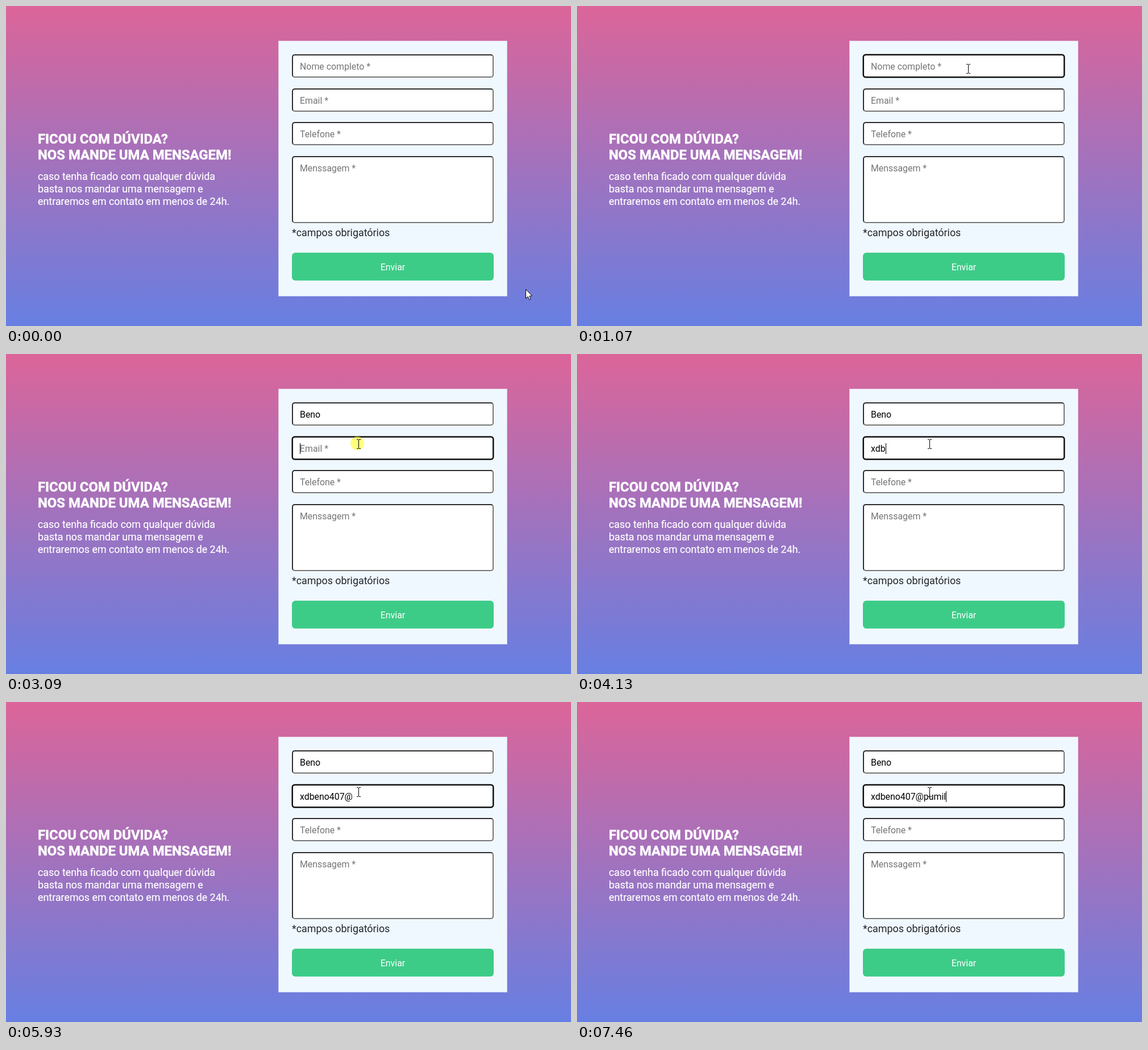
An HTML page with a canvas for the animation above (7990 ms loop, 994 by 563 pixels).

```html
<!DOCTYPE html>
<html lang="pt-BR">
<head>
<meta charset="utf-8">
<title>Formulário de contato</title>
<style>
  html, body { margin: 0; width: 100%; height: 100%; overflow: hidden; }
  body { position: relative; font: 17.86px/22px Roboto, sans-serif; color: #fff;
         background: linear-gradient(#dc6599, #677fe2); }
  body > * { position: absolute; box-sizing: border-box; margin: 0; white-space: pre; }
  h1 { left: 56px; top: 220px; font-size: 23.86px; line-height: 28px; font-weight: 700;
       -webkit-text-stroke: 0.5px #fff; }
  p { left: 56px; top: 289px; -webkit-text-stroke: 0.2px #fff; }
  #panel { left: 479px; top: 61px; width: 403px; height: 450px; background: #f0f8ff;
           background-clip: padding-box; border: 1px solid rgba(240,248,255,0.65); }
  .field { left: 503px; width: 355px; height: 41px; padding: 10px 12px; background: #fff;
           border: 2px solid; border-color: #2e2e2e #767676 #767676 #2e2e2e;
           border-radius: 5px; font-size: 15.88px; line-height: 19px; color: #757575; }
  .field.filled { color: #000; }
  .field.focus { border-color: #101010; box-shadow: 0 0 0 0.5px #101010; }
  .caret { display: inline-block; width: 1px; height: 19px; margin-right: -1px;
           background: #000; vertical-align: top; }
  #note { left: 503px; top: 388px; color: #212529; }
  #send { left: 503px; top: 434px; width: 355px; height: 49px; border-radius: 6px;
          background: #3dcc88; font-size: 15.88px; line-height: 51px; text-align: center; }
  #pointer { left: 0; top: 0; }
</style>
</head>
<body>
<h1>FICOU COM DÚVIDA?
NOS MANDE UMA MENSAGEM!</h1>
<p>caso tenha ficado com qualquer dúvida
basta nos mandar uma mensagem e
entraremos em contato em menos de 24h.</p>
<div id="panel"></div>
<div class="field" id="name" style="top:85px"></div>
<div class="field" id="email" style="top:145px"></div>
<div class="field" style="top:204px">Telefone *</div>
<div class="field" style="top:264px;height:118px">Menssagem *</div>
<div id="note">*campos obrigatórios</div>
<div id="send">Enviar</div>
<canvas id="pointer" width="994" height="563"></canvas>
<script>
const LOOP = 7990, BLINK = 530;
const ctx = document.getElementById('pointer').getContext('2d');

const fields = [
  { el: document.getElementById('name'), hint: 'Nome completo *', text: 'Beno',
    focus: 540, blur: 3090, keys: [1600, 1870, 2000, 2130] },
  { el: document.getElementById('email'), hint: 'Email *', text: 'xdbeno407@pumil',
    focus: 3090, blur: LOOP,
    keys: [3870, 4000, 4130, 4260, 4390, 4520, 4920, 5070, 5200, 5400,
           6660, 6860, 7060, 7190, 7460] }
];

// time, x, y, shape
const moves = [
  [0, 914, 498, 'arrow'], [70, 892, 448, 'arrow'], [140, 800, 290, 'beam'],
  [200, 716, 158, 'beam'], [270, 688, 114, 'beam'], [470, 688, 110, 'beam'],
  [2730, 685, 113, 'beam'], [2800, 669, 127, 'arrow'], [2870, 648, 141, 'arrow'],
  [2950, 629, 154, 'beam'], [3020, 620, 158, 'beam'],
  [6460, 969, 178, 'arrow'], [6660, 620, 158, 'beam']
];
const clicks = [540, 3090], CLICK_LENGTH = 70;

function showField(f, t) {
  const typed = f.keys.filter(k => k <= t);
  const focused = t >= f.focus && t < f.blur;
  const since = t - (typed.length ? typed[typed.length - 1] : f.focus);
  const caret = focused && Math.floor(since / BLINK) % 2 === 0;
  const mark = caret ? '<span class="caret"></span>' : '';
  const html = typed.length ? f.text.slice(0, typed.length) + mark : mark + f.hint;
  if (f.html !== html) f.el.innerHTML = f.html = html;
  f.el.classList.toggle('filled', typed.length > 0);
  f.el.classList.toggle('focus', focused);
}

function arrow(x, y) {
  const shape = [[0, 0], [0, 16], [3.7, 12.7], [6.2, 18.2], [8.7, 17.1], [6.3, 11.7], [11.2, 11.4]];
  ctx.beginPath();
  shape.forEach(([dx, dy]) => ctx.lineTo(x + dx + 0.5, y + dy + 0.5));
  ctx.closePath();
  ctx.fillStyle = '#fff';
  ctx.fill();
  ctx.strokeStyle = '#000';
  ctx.lineWidth = 1;
  ctx.stroke();
}

function beam(x, y) {
  ctx.fillStyle = '#000';
  ctx.fillRect(x, y - 7, 1, 15);
  for (const dy of [-8, 8]) {
    ctx.fillRect(x - 3, y + dy, 3, 1);
    ctx.fillRect(x + 1, y + dy, 3, 1);
  }
}

function showPointer(t) {
  const [, x, y, shape] = moves.filter(m => m[0] <= t).pop();
  ctx.clearRect(0, 0, 994, 563);
  if (clicks.some(c => t >= c && t < c + CLICK_LENGTH)) {
    ctx.fillStyle = 'rgba(255,255,0,0.5)';
    ctx.beginPath();
    ctx.arc(x - 2, y - 1, 12, 0, Math.PI * 2);
    ctx.fill();
  }
  (shape === 'arrow' ? arrow : beam)(x, y);
}

function draw() {
  const t = performance.now() % LOOP;
  fields.forEach(f => showField(f, t));
  showPointer(t);
  requestAnimationFrame(draw);
}
draw();
</script>
</body>
</html>
```
